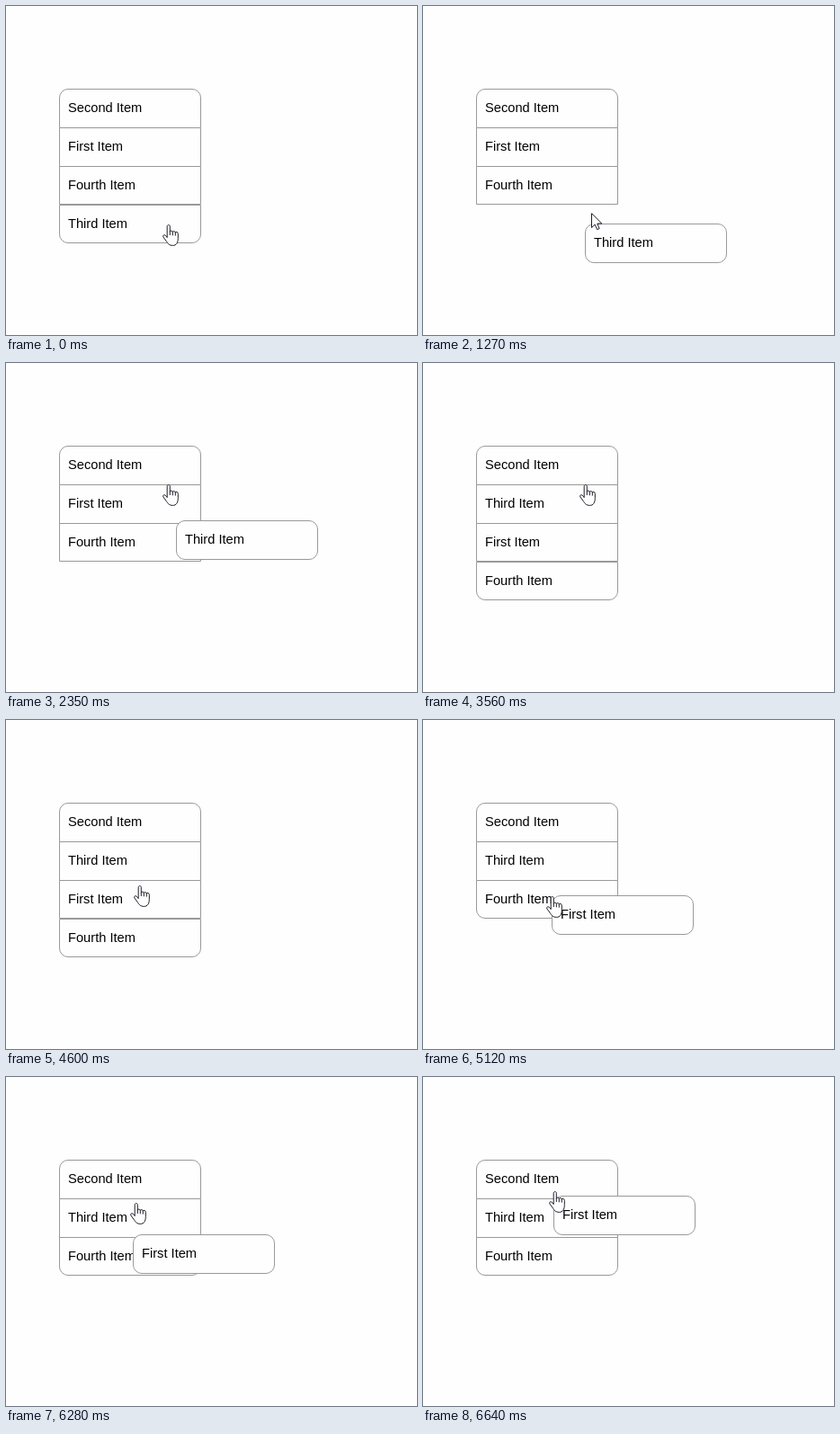
Write an HTML page that moves like this. It is 457 px wide and 366 px high and loops after 8 s.

```html
<!DOCTYPE html>
<html lang="en">
<head>
<meta charset="utf-8">
<title>Sortable list</title>
<style>
  html, body { margin: 0; width: 100%; height: 100%; overflow: hidden; background: #fefefe; }
  svg { display: block; }
  text { font: 14.667px "Liberation Sans", Arial, sans-serif; fill: #000; }
  .card { fill: #fefefe; stroke: #999; }
  .cursor { fill: #fff; stroke: #1c1c28; stroke-linejoin: round; }
</style>
</head>
<body>
<svg id="stage" width="457" height="366" viewBox="0 0 457 366"></svg>
<script>
const LOOP = 8000, LEFT = 59, WIDTH = 158, RADIUS = 9.5;
const ITEMS = ['Second', 'First', 'Fourth', 'Third'];
const rowTop = i => 92 + 43 * i;
const LIST_BOTTOM = rowTop(3);
const HAND = 'M5.2 14.6V2.2C5.2 0 8.3 0 8.3 2.2V8.2C8.3 6.7 11.3 6.7 11.3 8.5' +
  'C11.3 7.2 14.3 7.3 14.3 9.1C14.3 7.9 17.3 8.1 17.3 10.3V15.5' +
  'C17.3 20.5 15.2 23.4 11.6 23.4C7.2 23.4 6 21.2 4.4 18.8L.9 14C-.2 12.2 2.2 10.8 3.8 12.7Z' +
  'M8.3 8V12M11.3 8.4V12.3M14.3 9V12.6';
const ARROW = 'M.5.7V16.6L4.2 13.1L6.6 18.7L9.1 17.6L6.8 12.1H11.8Z';

// Pointer strokes: each eases out from where the last one ended, in `count` steps, bowed sideways.
const REST = { x: 174, y: 243 };
const strokes = [
  { start: 1150, step: 120, count: 1, x: 180, y: 230, bow: 0, power: 1 },
  { start: 1270, step: 135, count: 8, x: 174, y: 135, bow: 7.5, power: 2 },
  { start: 4006, step: 144, count: 6, x: 137.4, y: 196, bow: -5, power: 1.5 },
  { start: 5560, step: 120, count: 9, x: 140, y: 127, bow: -3, power: 1.5 }
];
const drags = [
  { label: 'Third', start: 560, end: 3560, to: 1 },
  { label: 'First', start: 5120, end: LOOP, to: 0 }
];

function pointer(time) {
  let { x, y } = REST;
  for (const s of strokes) {
    if (time < s.start) break;
    const u = Math.min(Math.floor((time - s.start) / s.step) / s.count, 1);
    const e = 1 - (1 - u) ** s.power;
    x += (s.x - x) * e + s.bow * Math.sin(Math.PI * e);
    y += (s.y - y) * e;
  }
  return { x, y };
}

const rowAt = y => [0, 1, 2, 3].filter(i => y + 1 >= rowTop(i)).length;

// The dragged card jumps to the pointer only when the pointer enters another row.
function heldCard(start, time) {
  const grab = pointer(start);
  let x = grab.x, y = grab.y - 1, row = rowAt(grab.y);
  for (let t = start; t <= time; t += 5) {
    const p = pointer(t), entered = rowAt(p.y);
    if (entered !== row) {
      row = entered;
      x = p.x;
      y = rowTop(row) - 3;
    }
  }
  return { x: Math.round(x + 5.5), y: Math.round(y) };
}

function card(label, x, y, height, top, bottom) {
  const w = WIDTH - 1, h = height - 1;
  const corner = (r, dx, dy) => r ? `a${r} ${r} 0 0 1 ${dx * r} ${dy * r}` : '';
  const path = `M${x + .5} ${y + .5 + top}${corner(top, 1, -1)}h${w - 2 * top}${corner(top, 1, 1)}` +
    `v${h - top - bottom}${corner(bottom, -1, 1)}h${2 * bottom - w}${corner(bottom, -1, -1)}z`;
  return `<path class="card" d="${path}"/><text x="${x + 10}" y="${y + 26}">${label} Item</text>`;
}

function scene(time) {
  let rows = ITEMS, last = rows.at(-1), drag = null;
  for (const d of drags.filter(d => time >= d.start)) {
    last = rows.at(-1);
    rows = rows.filter(label => label !== d.label);
    if (time < d.end) drag = d;
    else {
      rows.splice(d.to, 0, d.label);
      last = rows.at(-1);
    }
  }

  // Only the last child has a rounded bottom, even while it is being dragged.
  let out = rows.map((label, i) => card(label, LEFT, rowTop(i), i < 2 ? 44 : 43,
    i ? 0 : RADIUS, label === last ? RADIUS : 0)).join('');
  if (drag) {
    const held = heldCard(drag.start, time);
    out += card(drag.label, held.x, held.y, 44, RADIUS, RADIUS);
  }

  const { x, y } = pointer(time);
  const offList = drag && y > LIST_BOTTOM;
  const place = `translate(${Math.round(x) + (offList ? 7 : 0)} ${Math.round(y)})`;
  return out + `<path class="cursor" transform="${place}" d="${offList ? ARROW : HAND}"/>`;
}

const stage = document.getElementById('stage');
const start = performance.now();
let shown = '';
function draw() {
  const next = scene((performance.now() - start) % LOOP);
  if (next !== shown) stage.innerHTML = shown = next;
  requestAnimationFrame(draw);
}
draw();
</script>
</body>
</html>
```
